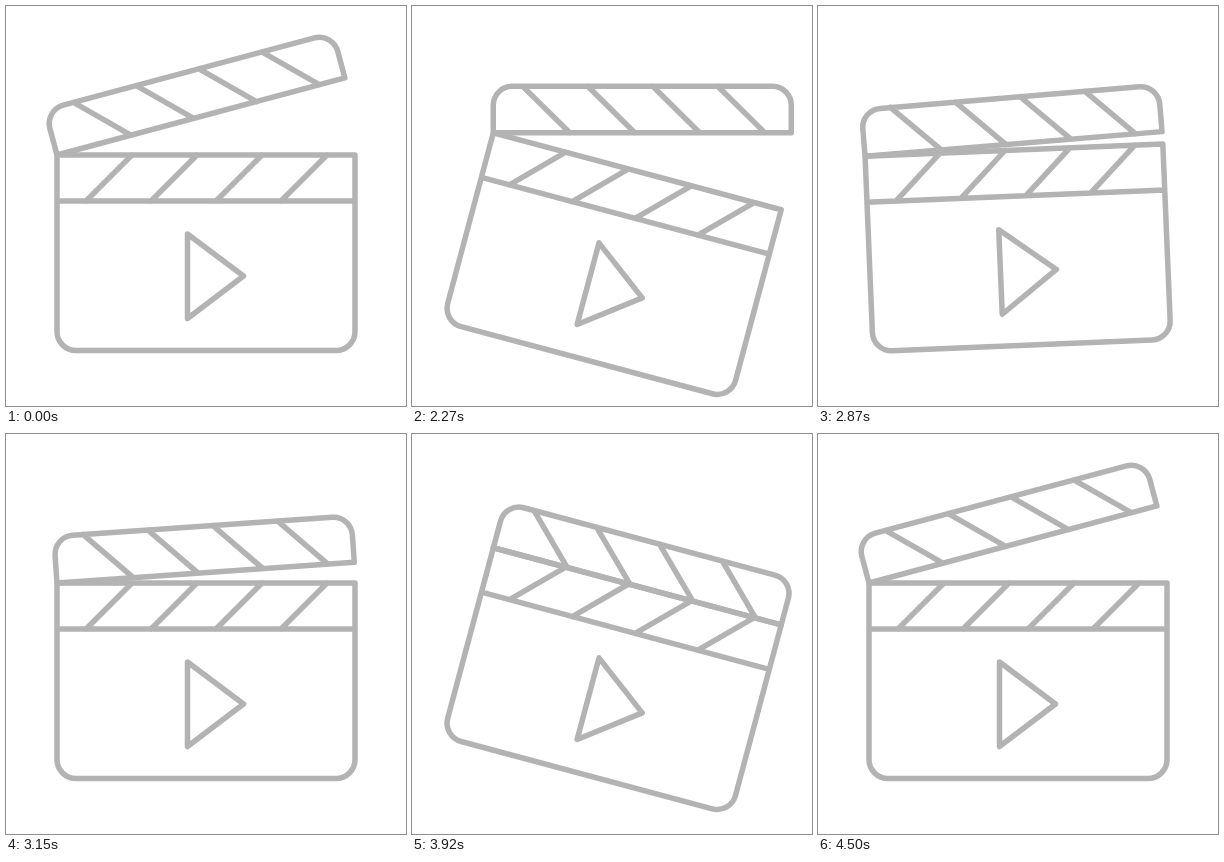
Recreate the animation shown at these times as an HTML page with a canvas. Size 400 px wide and 400 px high, loop 4520 ms.

```html
<!DOCTYPE html>
<html lang="en">
<head>
<meta charset="utf-8">
<title>Clapperboard</title>
<style>
  html, body { margin: 0; width: 100%; height: 100%; overflow: hidden; background: #fff; }
  canvas { display: block; width: 100vmin; height: 100vmin; }
</style>
</head>
<body>
<canvas id="stage" width="400" height="400"></canvas>
<script>
const ctx = document.getElementById('stage').getContext('2d');
const LOOP = 4520;
const LEFT = 51, RIGHT = 349, HINGE_Y = 149, BOTTOM = 344.5;
const BAND_Y = 195, ARM_TOP = 102.5, RADIUS = 19, STRIPE_GAP = 65;
const CENTER_X = (LEFT + RIGHT) / 2, CENTER_Y = (HINGE_Y + BOTTOM) / 2;

// Times in ms: wind up, swing back, clap shut, then wind up again and open.
const WIND = 2000, SWING = 2265, CLAP = 2620, SHUT = 2945;
const REWIND = 3655, OPEN = 3920, OPENED = 4205;

const linear = (t, from, to) => Math.min(1, Math.max(0, (t - from) / (to - from)));
const ease = (t, from, to) => {
  const p = linear(t, from, to);
  return p * p * (3 - 2 * p);
};
const bump = (t, from, to) => Math.sin(Math.PI * linear(t, from, to)) ** 2;

// Angles in degrees, clockwise.
const tilt = t =>
  15 * ease(t, WIND, SWING) - 33 * ease(t, SWING, SWING + 290) + 18 * ease(t, CLAP, SHUT)
  + 15 * ease(t, REWIND, OPEN) - 15 * ease(t, OPEN, OPENED - 15);

const armAngle = t =>
  -15 - 3 * ease(t, CLAP - 140, CLAP) + 18 * ease(t, CLAP, SHUT) - 4 * bump(t, SHUT, 3380)
  - 19.5 * ease(t, OPEN + 5, OPENED) + 4.5 * ease(t, OPENED, 4505);

const drop = t =>
  13 * linear(t, WIND, SWING) - 18 * ease(t, CLAP, CLAP + 240) + 5 * ease(t, CLAP + 240, 3060);

function line(x0, y0, x1, y1) {
  ctx.moveTo(x0, y0);
  ctx.lineTo(x1, y1);
}

function stripes(x0, y0, x1, y1) {
  for (let i = 0; i < 4; i++) line(x0 + i * STRIPE_GAP, y0, x1 + i * STRIPE_GAP, y1);
}

// Box with square corners at yFlat and rounded corners at yRound.
function halfRoundBox(yFlat, yRound) {
  ctx.moveTo(LEFT, yFlat);
  ctx.arcTo(LEFT, yRound, RIGHT, yRound, RADIUS);
  ctx.arcTo(RIGHT, yRound, RIGHT, yFlat, RADIUS);
  ctx.lineTo(RIGHT, yFlat);
  ctx.closePath();
}

function rotateAbout(x, y, degrees) {
  ctx.translate(x, y);
  ctx.rotate(degrees * Math.PI / 180);
  ctx.translate(-x, -y);
}

function drawBody() {
  ctx.beginPath();
  halfRoundBox(HINGE_Y, BOTTOM);
  line(LEFT, BAND_Y, RIGHT, BAND_Y);
  stripes(80, BAND_Y, 126, HINGE_Y);
  line(181.5, 228, 237.5, 270);
  ctx.lineTo(181.5, 312.5);
  ctx.closePath();
  ctx.stroke();
}

function drawArm() {
  ctx.beginPath();
  halfRoundBox(HINGE_Y, ARM_TOP);
  stripes(80.5, ARM_TOP, 127.5, HINGE_Y);
  ctx.stroke();
}

function draw(t) {
  ctx.fillStyle = '#fff';
  ctx.fillRect(0, 0, 400, 400);
  ctx.strokeStyle = '#b3b3b3';
  ctx.lineWidth = 5.5;
  ctx.lineJoin = ctx.lineCap = 'round';
  ctx.save();
  ctx.translate(0, drop(t));
  rotateAbout(CENTER_X, CENTER_Y, tilt(t));
  drawBody();
  rotateAbout(LEFT, HINGE_Y, armAngle(t));
  drawArm();
  ctx.restore();
}

const start = performance.now();
function tick() {
  draw((performance.now() - start) % LOOP);
  requestAnimationFrame(tick);
}
tick();
</script>
</body>
</html>
```
